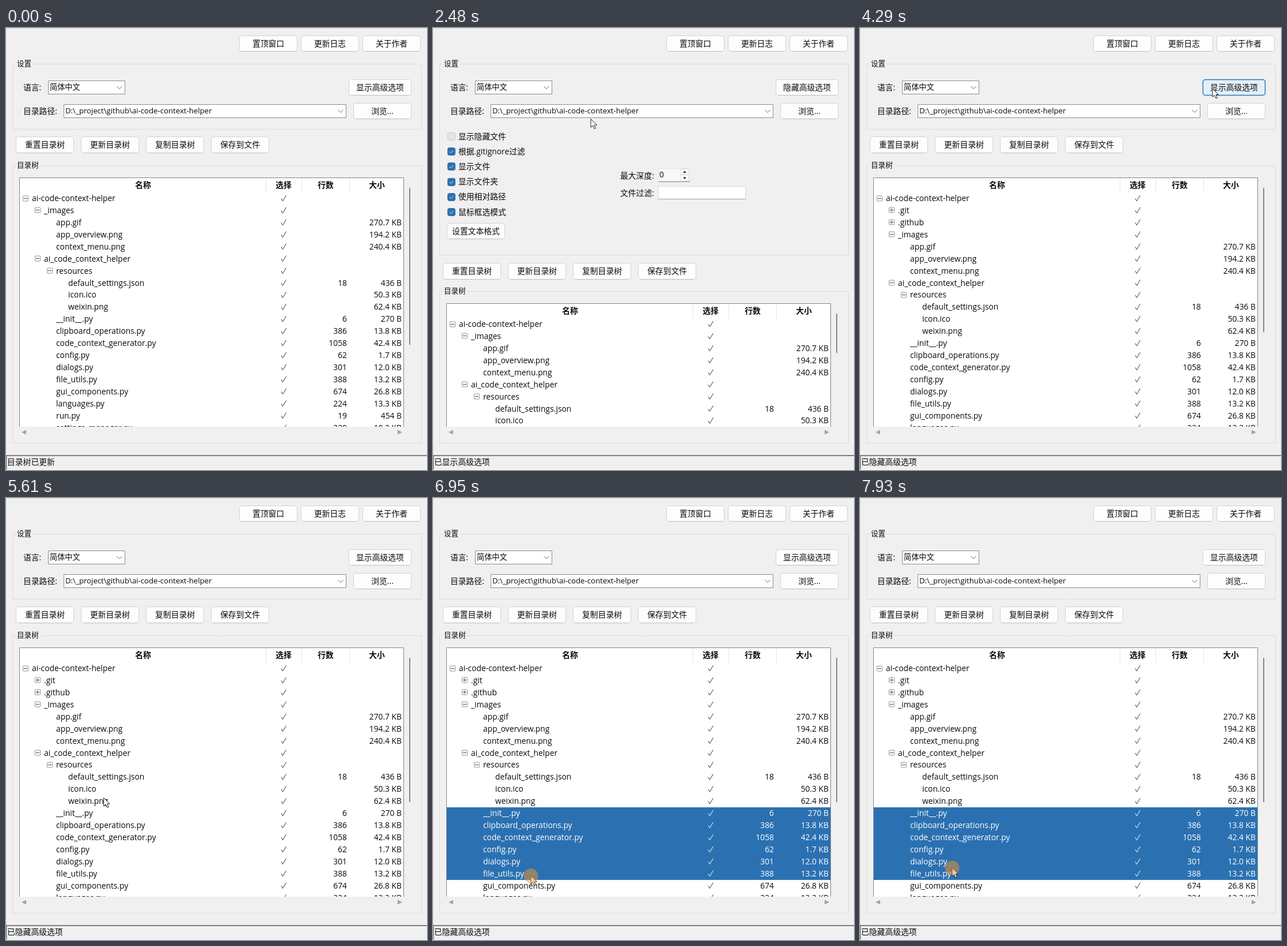
These frames come from a looping animation (731x766 px, 8 s). An HTML page with a canvas:

```html
<!DOCTYPE html>
<html lang="zh">
<head>
<meta charset="utf-8">
<style>
  html, body { margin: 0; width: 100%; height: 100%; overflow: hidden; background: #f0f0f0; }
  canvas { display: block; }
</style>
</head>
<body>
<canvas id="stage" width="731" height="766"></canvas>
<script>
const ctx = document.getElementById('stage').getContext('2d');
const FAMILY = '"Open Sans", "Noto Sans CJK SC", "Noto Sans CJK", sans-serif';
const LOOP = 8000, ROW = 20.92, SHIFT = 218.5;
const INK = '#0a0a0a', BLUE = '#2b71b1';
const PROJECT = 'D:\\_project\\github\\ai-code-context-helper';

// Moments in ms
const T = { enter: 130, expand: 1660, focusBox: 2830, collapse: 4160, drag: 6090 };
const TOGGLES = [2900, 3040, 3250];
const PRESSES = [[1390, 1660], [2830, 2900], [2970, 3040], [3170, 3250], [3950, 4160], [T.drag, LOOP]];
const PATH = [
  [130, 725, 764], [400, 640, 520], [650, 562, 300], [900, 600, 172], [1110, 632, 104],
  [2000, 632, 104], [2400, 330, 150], [2760, 81, 184], [3320, 81, 184], [3600, 470, 135],
  [3800, 612, 105], [4360, 612, 105], [4910, 410, 200], [5680, 146, 551], [5820, 144, 549],
  [5890, 142, 548], [6090, 142, 548], [6420, 150, 611], [6490, 150, 611], [6800, 165, 668],
  [6950, 170, 655], [7230, 176, 567], [7510, 176, 567], [7930, 160, 641], [8000, 160, 641]
];

// level, name, lines, size, expander
const ROOT = [[0, 'ai-code-context-helper', '', '', '-']];
const HIDDEN = [[1, '.git', '', '', '+'], [1, '.github', '', '', '+']];
const FILES = [
  [1, '_images', '', '', '-'],
  [2, 'app.gif', '', '270.7 KB'],
  [2, 'app_overview.png', '', '194.2 KB'],
  [2, 'context_menu.png', '', '240.4 KB'],
  [1, 'ai_code_context_helper', '', '', '-'],
  [2, 'resources', '', '', '-'],
  [3, 'default_settings.json', '18', '436 B'],
  [3, 'icon.ico', '', '50.3 KB'],
  [3, 'weixin.png', '', '62.4 KB'],
  [2, '__init__.py', '6', '270 B'],
  [2, 'clipboard_operations.py', '386', '13.8 KB'],
  [2, 'code_context_generator.py', '1058', '42.4 KB'],
  [2, 'config.py', '62', '1.7 KB'],
  [2, 'dialogs.py', '301', '12.0 KB'],
  [2, 'file_utils.py', '388', '13.2 KB'],
  [2, 'gui_components.py', '674', '26.8 KB'],
  [2, 'languages.py', '224', '13.3 KB'],
  [2, 'run.py', '19', '454 B'],
  [2, 'settings_manager.py', '239', '10.2 KB']
];
const FIRST_SELECTED = 12;
const OPTIONS = ['显示隐藏文件', '根据.gitignore过滤', '显示文件', '显示文件夹', '使用相对路径', '鼠标框选模式'];

function text(str, x, y, { size = 13.8, align = 'left', color = INK, weight = 400 } = {}) {
  ctx.font = `${weight} ${size}px ${FAMILY}`;
  ctx.textAlign = align;
  ctx.fillStyle = color;
  ctx.fillText(str, x, Math.round(y + 4.6));
}

function rect(x, y, w, h, color) {
  ctx.fillStyle = color;
  ctx.fillRect(x, y, w, h);
}

function box(x, y, w, h, fill, stroke, radius = 0, width = 1) {
  ctx.beginPath();
  ctx.roundRect(x + .5, y + .5, w - 1, h - 1, radius);
  if (fill) { ctx.fillStyle = fill; ctx.fill(); }
  ctx.strokeStyle = stroke;
  ctx.lineWidth = width;
  ctx.stroke();
}

function line(points, color, width = 1) {
  ctx.beginPath();
  points.forEach(([x, y]) => ctx.lineTo(x, y));
  ctx.strokeStyle = color;
  ctx.lineWidth = width;
  ctx.stroke();
}

function polygon(points, color) {
  ctx.beginPath();
  points.forEach(([x, y]) => ctx.lineTo(x, y));
  ctx.closePath();
  ctx.fillStyle = color;
  ctx.fill();
}

function button(label, x, y, w, h, { cursor, pressed }) {
  const hover = cursor && cursor.x >= x && cursor.x < x + w && cursor.y >= y && cursor.y < y + h;
  if (hover) {
    box(x, y, w, h, pressed ? '#c9e4f6' : '#e3f0fa', pressed ? '#1f6299' : '#2b79b8', 4, 1.5);
  } else {
    box(x, y, w, h, '#fdfdfd', '#d2d2d2', 4);
    line([[x + 4, y + h - .5], [x + w - 4, y + h - .5]], '#bdbdbd');
  }
  text(label, x + w / 2, y + h / 2, { align: 'center' });
}

function group(label, y, bottom, labelWidth) {
  box(11, y, 711, bottom - y, null, '#dcdcdc');
  rect(17, y - 2, labelWidth + 4, 5, '#f0f0f0');
  text(label, 19, y - 1, { size: 12.6 });
}

function combo(value, x, y, w, h) {
  box(x, y, w, h, '#fff', '#8c8c8c');
  text(value, x + 3, y + h / 2 - .5, { size: 13.2 });
  const cx = x + w - 10, cy = y + h / 2;
  line([[cx - 4.5, cy - 2], [cx, cy + 2.5], [cx + 4.5, cy - 2]], '#666');
}

function options(state) {
  OPTIONS.forEach((label, i) => {
    const y = 188 + i * 26.2, top = Math.round(y) - 7;
    if (i || state.showHidden) {
      box(25, top, 14, 14, BLUE, BLUE, 3);
      line([[28.5, top + 7], [31, top + 9.5], [35.5, top + 5]], '#d5e5f3');
    } else {
      box(25, top, 14, 14, '#e4e4e4', '#c8c8c8', 3);
    }
    text(label, 44, y);
  });
  if (state.boxFocused) {
    ctx.setLineDash([1, 1]);
    box(43, 178, 84, 20, null, '#333');
    ctx.setLineDash([]);
  }
  text('最大深度:', 325, 256);
  box(391, 243, 55, 23, '#f8f8f8', '#e2e2e2');
  line([[391, 266.5], [446, 266.5]], '#8c8c8c');
  text('0', 393, 254);
  box(429, 244, 15, 10, '#fff', '#ddd');
  box(429, 255, 15, 10, '#fff', '#ddd');
  polygon([[434, 251], [440, 251], [437, 247.5]], '#222');
  polygon([[434, 258.5], [440, 258.5], [437, 262]], '#222');
  text('文件过滤:', 325, 286);
  box(391, 274, 152, 23, '#fff', '#dadada');
  line([[391, 296.5], [543, 296.5]], '#a5a5a5');
  button('设置文本格式', 24, 338, 101, 28, state);
}

function expander(x, y, sign) {
  box(x - 5, y - 5, 10, 10, '#fff', '#929292', 1);
  line([[x - 3, y], [x + 3, y]], '#3c4a66');
  if (sign === '+') line([[x, y - 3], [x, y + 3]], '#3c4a66');
}

function tree(state, top) {
  rect(23, top, 668, 691 - top, '#fff');
  ctx.save();
  ctx.beginPath();
  ctx.rect(23, top, 668, 691 - top);
  ctx.clip();
  [['名称', 238], ['选择', 482], ['行数', 555], ['大小', 644]].forEach(([label, x]) =>
    text(label, x, top + 13, { align: 'center', weight: 700 }));
  [451.5, 513.5, 596.5].forEach(x => line([[x, top + 1], [x, top + 27]], '#e4e4e4'));

  const rows = [...ROOT, ...(state.showHidden ? HIDDEN : []), ...FILES];
  rows.forEach(([level, name, lines, size, sign], i) => {
    const y = top + 36.5 + i * ROW;
    const selected = i >= FIRST_SELECTED && i <= state.lastSelected;
    const color = selected ? '#fff' : INK;
    if (selected) rect(24, y - ROW / 2, 667, ROW + .3, BLUE);
    if (sign) expander(34 + level * 21, Math.round(y) - .5, sign);
    text(name, 45 + level * 21, y, { color });
    line([[478, y], [480.5, y + 4.5], [486.5, y - 5.5]], selected ? '#fff' : '#333');
    text(lines, 592, y, { color, align: 'right' });
    text(size, 687, y, { color, align: 'right' });
  });
  ctx.restore();

  line([[23.5, 691], [23.5, top + .5], [690.5, top + .5], [690.5, 691]], '#858585');
  const thumb = state.expanded ? (state.showHidden ? 62 : 68) : (state.showHidden ? 250 : 272);
  rect(700, top + 18, 2, thumb, '#868686');
  polygon([[27, 700.5], [35, 696.5], [35, 704.5]], '#a3a3a3');
  polygon([[688, 700.5], [680, 696.5], [680, 704.5]], '#a3a3a3');
}

function pointer({ x, y }, pressed) {
  const shape = [[0, 0], [0, 14.5], [3.5, 11.5], [6, 17], [8.5, 16], [6, 10.5], [10.5, 10.5]]
    .map(([dx, dy]) => [x + dx, y + dy]);
  polygon(shape, '#fff');
  line([...shape, shape[0]], '#222');
  if (!pressed) return;
  ctx.beginPath();
  ctx.arc(x, y, 12.5, 0, Math.PI * 2);
  ctx.fillStyle = 'rgba(250, 150, 40, .5)';
  ctx.fill();
}

function cursorAt(t) {
  if (t < T.enter) return null;
  const next = Math.max(1, PATH.findIndex(([time]) => time > t));
  const [t0, x0, y0] = PATH[next - 1], [t1, x1, y1] = PATH[next];
  const k = (t - t0) / (t1 - t0);
  return { x: x0 + (x1 - x0) * k, y: y0 + (y1 - y0) * k };
}

function stateAt(t) {
  const cursor = cursorAt(t);
  const firstTop = 259 + 36.5 + (FIRST_SELECTED - .5) * ROW;
  return {
    cursor,
    pressed: PRESSES.some(([from, to]) => t >= from && t < to),
    expanded: t >= T.expand && t < T.collapse,
    showHidden: TOGGLES.filter(time => t >= time).length % 2 === 1,
    boxFocused: t >= T.focusBox && t < 3950,
    lastSelected: t < T.drag ? -1 : FIRST_SELECTED + Math.floor((cursor.y - firstTop) / ROW),
    status: t < T.expand ? '目录树已更新'
      : t < TOGGLES[0] ? '已显示高级选项'
      : t < T.collapse ? `完成: 已生成 ${PROJECT} 的目录树`
      : '已隐藏高级选项'
  };
}

function draw(t) {
  const state = stateAt(t);
  const shift = state.expanded ? SHIFT : 0;
  rect(0, 0, 731, 766, '#f0f0f0');
  rect(0, 0, 731, 1, '#dadada');
  rect(0, 0, 1, 740, '#e3e0e0');

  ['置顶窗口', '更新日志', '关于作者'].forEach((label, i) =>
    button(label, 405 + i * 107, 13, 101, 28, state));

  group('设置', 62, 176 + Math.floor(shift), 25);
  text('语言:', 30, 103);
  combo('简体中文', 73, 91, 134, 24);
  button(state.expanded ? '隐藏高级选项' : '显示高级选项', 595, 89, 109, 28, state);
  text('目录路径:', 30, 144);
  combo(PROJECT, 100, 132, 491, 24);
  button('浏览...', 603, 130, 101, 28, state);
  if (state.expanded) options(state);

  const toolbarY = 188 + Math.round(shift);
  ['重置目录树', '更新目录树', '复制目录树', '保存到文件'].forEach((label, i) =>
    button(label, 17 + i * 113, toolbarY, 101, 29, state));

  group('目录树', 238 + Math.floor(shift), 720, 38);
  tree(state, 259 + Math.floor(shift));

  rect(0, 740, 731, 2, '#808080');
  rect(0, 740, 1.5, 25, '#808080');
  rect(0, 765, 731, 1, '#fafafa');
  text(state.status, 2, 752);

  if (state.cursor) pointer(state.cursor, state.pressed);
}

const start = performance.now();
function tick() {
  draw((performance.now() - start) % LOOP);
  requestAnimationFrame(tick);
}
tick();
</script>
</body>
</html>
```
